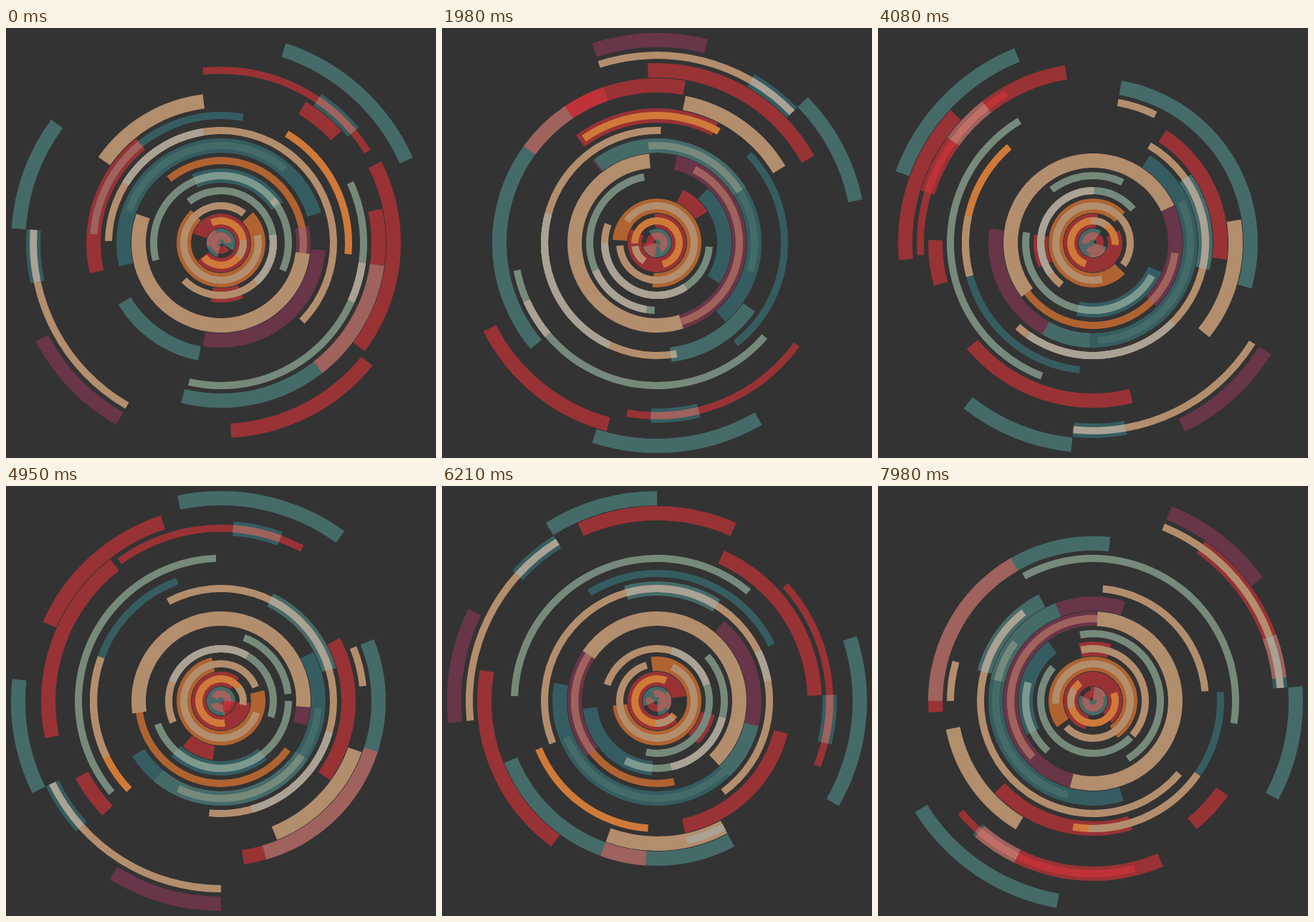
An HTML page with a canvas that plays this animation: 600x600 px, repeating every 8000 ms.

```html
<!DOCTYPE html>
<html lang="en">
<head>
<meta charset="utf-8">
<title>Spinning rings</title>
<style>
  html, body { margin: 0; width: 100%; height: 100%; overflow: hidden; background: #333; }
  canvas { display: block; width: 600px; height: 600px; }
</style>
</head>
<body>
<canvas id="stage" width="600" height="600"></canvas>
<script>
const ctx = document.getElementById('stage').getContext('2d');
const LOOP = 8000, TICK = 30, UNIT = 16, PITCH = 21;

const colors = {
  T: '#456b69', D: '#355d61', R: '#993235', Q: '#993235', N: '#b38e6d',
  P: '#683549', S: '#768a7c', O: '#d07a39', K: '#b06330', X: '#9f625d'
};
const pink = colors.X, pale = '#aaa294', bright = '#bf3238';

// Colour where two arcs of one ring overlap; other pairs simply cover.
const blends = {
  DN: pale, NT: pale, NN: pale, NS: pale, SS: pale, DS: '#7d998d',
  DR: pink, DQ: pink, RT: pink, KP: pink, RR: bright, QR: bright, RX: '#c06f66',
  DO: colors.N, DP: colors.T, PT: colors.S
};

// Innermost ring first. Each arc: colour key (lower case = half width),
// start and length in units, degrees per tick.
const rings = [
  'R 16 5 -1, T 12 18 2, r 8 20 1',
  'R 18 19 1, o 21 16 -1, n 5 3 2',
  'K 3 17 -2, n 5 20 -2',
  'R 10 2 -2, s 20 11 2, n 5 9 1',
  'D 21 5 1, s 16 10 -1, s 3 4 2',
  'P 5 12 -1, k 20 9 1, N 6 12 1',
  'P 6 6 -2, D 16 11 1, t 18 7 1',
  'T 12 3 -1, n 19 12 -2, n 17 5 -1',
  'R 16 4 1, d 17 6 2, o 2 4 -1',
  's 4 8 1, N 19 3 1, n 6 1 2',
  'R 5 4 -2, R 2 1 -1, T 6 6 2',
  'R 4 4 -1, q 22 4 2, D 2 1 2, x 2 1 2',
  'R 8 3 1, n 13 4 2, D 16 1 2',
  'P 13 2 2, T 17 2 2, T 1 3 2'
].map((ring, level) => ring.split(', ').map(text => {
  const [letter, start, length, speed] = text.split(' ');
  const key = letter.toUpperCase();
  const inset = letter === key ? 0 : 5;
  return {
    key, speed: +speed, start: start * UNIT, length: length * UNIT,
    inner: level * PITCH + inset, outer: level * PITCH + 20 - inset
  };
}));

const radians = degrees => (degrees - 90) * Math.PI / 180;
const wrap = degrees => ((degrees % 360) + 360) % 360;

function drawBand(inner, outer, from, to, color) {
  ctx.beginPath();
  ctx.arc(300, 300, outer, radians(from), radians(to));
  ctx.arc(300, 300, inner, radians(to), radians(from), true);
  ctx.closePath();
  ctx.fillStyle = color;
  ctx.fill();
}

function drawOverlap(a, b) {
  const color = blends[[a.key, b.key].sort().join('')];
  if (!color) return;
  const inner = Math.max(a.inner, b.inner), outer = Math.min(a.outer, b.outer);
  for (const turn of [-360, 0, 360]) {
    const from = Math.max(a.from, b.from + turn);
    const to = Math.min(a.from + a.length, b.from + b.length + turn);
    if (to > from) drawBand(inner, outer, from, to, color);
  }
}

function draw(tick) {
  ctx.fillStyle = '#333';
  ctx.fillRect(0, 0, 600, 600);
  for (const ring of rings) {
    ring.forEach((arc, i) => {
      arc.from = wrap(arc.start + arc.speed * (tick + 1));
      drawBand(arc.inner, arc.outer, arc.from, arc.from + arc.length, colors[arc.key]);
      ring.slice(0, i).forEach(under => drawOverlap(arc, under));
    });
  }
}

const began = performance.now();
function frame() {
  const time = Math.max(0, performance.now() - began) % LOOP;
  draw(Math.floor(time / TICK));
  requestAnimationFrame(frame);
}
frame();
</script>
</body>
</html>
```
